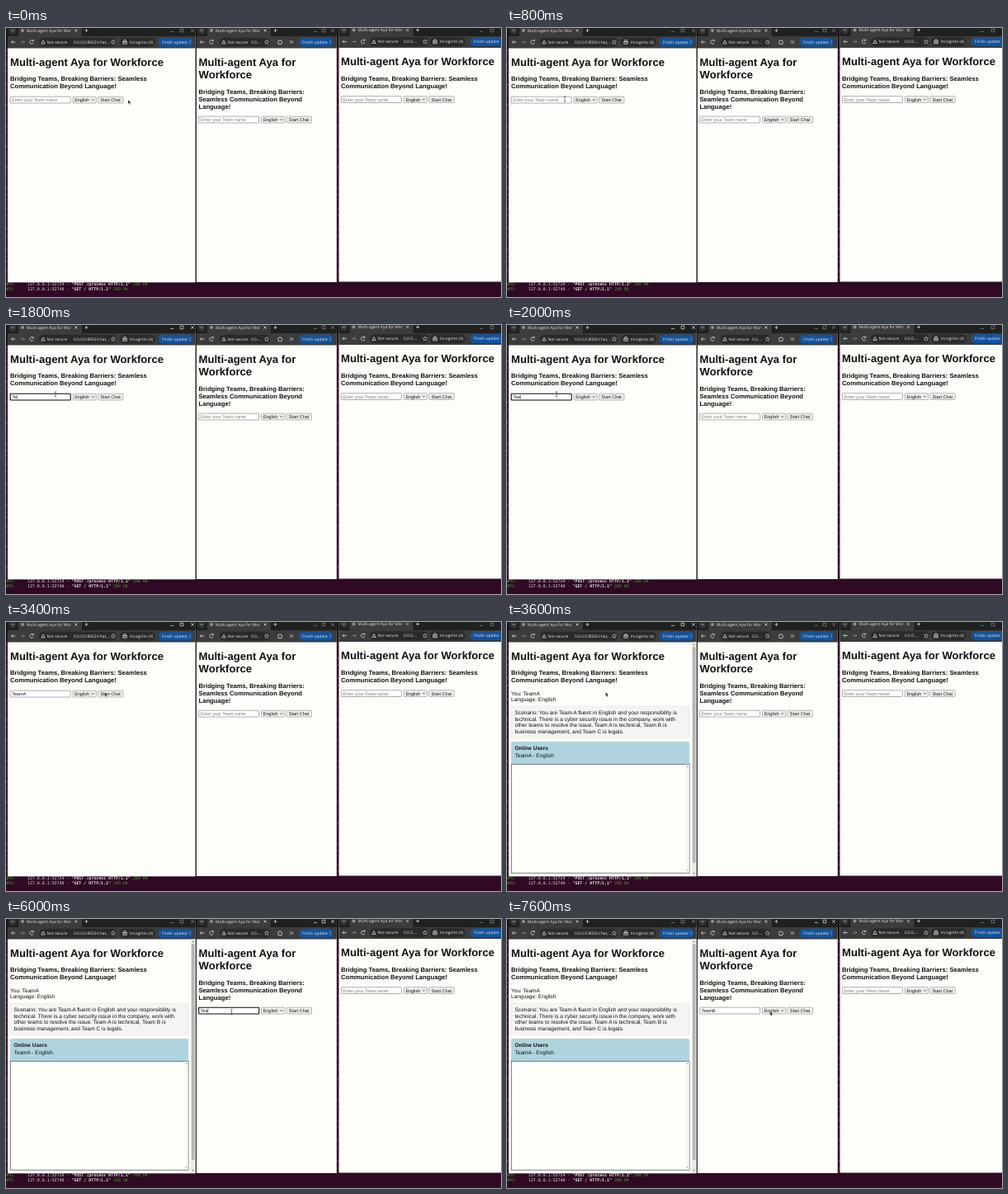
An HTML page for the animation above (8 s loop, 600 by 326 pixels).

```html
<!DOCTYPE html>
<html lang="en">
<head>
<meta charset="utf-8">
<title>Team chat</title>
<style>
  html, body { margin: 0; width: 100%; height: 100%; overflow: hidden; background: #300a24; }
  svg { display: block; }
  #stage { width: 600px; height: 326px; }
  text {
    font-family: "Liberation Sans", Arial, sans-serif; font-size: 6.56px; fill: #111;
    white-space: pre; text-rendering: geometricPrecision;
  }
  .h1 { font-size: 13.12px; font-weight: bold; }
  .h3 { font-size: 7.67px; font-weight: bold; }
  .b { font-weight: bold; }
  .form { font-size: 5.46px; }
  .hint { fill: #7b7b78; }
  .ui { font-family: "Open Sans", "Noto Sans", sans-serif; font-size: 4.9px; font-weight: 500; fill: #e6e6e4; }
  .term { font-family: "DejaVu Sans Mono", monospace; font-size: 4.94px; fill: #e4dfe2; }
  .ok { fill: #4e9a32; }
  .line { fill: none; stroke: #d6d6d4; stroke-width: .8; }
  .field { fill: #fff; stroke: #777; stroke-width: .6; }
  .focus { stroke: #0c0c0c; stroke-width: 1.1; }
  .btn { fill: #efefed; stroke: #777; stroke-width: .5; }
  .controls { opacity: .5; }
  .active .controls { opacity: 1; }
  .off { display: none; }
</style>
</head>
<body>
<svg id="stage" viewBox="0 0 600 326"></svg>
<script>
const LOOP = 8000, STEP = 200;
const stage = document.getElementById('stage');

const text = (x, y, str, cls = '') => `<text x="${x}" y="${y}" class="${cls}">${str}</text>`;
const rect = (x, y, w, h, fill, r = 0) =>
  `<rect x="${x}" y="${y}" width="${w}" height="${h}" rx="${r}" fill="${fill}"/>`;
const path = (d, extra = '') => `<path class="line" d="${d}" ${extra}/>`;
const lines = (x, y, gap, rows, cls) => rows.map((s, i) => text(x, y + i * gap, s, cls)).join('');

const back = x => path(`M${x + 2.5} 17h-5m2-2l-2 2 2 2`);
const forward = x => path(`M${x - 2.5} 17h5m-2-2l2 2-2 2`, 'opacity=".45"');
const reload = x => path(`M${x + 2} 15.6a2.3 2.3 0 1 0 .3 2.2M${x + 2.3} 14v1.8h-1.8`);
const star = x => path(`M${x} 14.4l.8 1.7 1.8.2-1.3 1.3.3 1.8-1.6-.9-1.6.9.3-1.8-1.3-1.3 1.8-.2z`, 'style="stroke-width:.6"');
const puzzle = x => path(`M${x - 2} 15.5h1.2a.9.9 0 0 1 1.8 0h1v1.3a.8.8 0 0 1 0 1.6v1.2h-4z`);
const more = x => path(`M${x - 2} 15.2l1.800 1.800-1.800 1.800m2.200-3.600l1.800 1.800-1.800 1.800`);
const guest = x => rect(x - 6, 11.7, 43, 10.8, '#292b2a', 5.4) + text(x + 6, 18.8, 'Incognito (4)', 'ui') +
  path(`M${x - 3} 16.5h6m-4.6 0l.6-2h2l.6 2`) +
  [-1.5, 1.5].map(d => `<circle cx="${x + d}" cy="18.6" r="1.1" class="line"/>`).join('');

function controls([min, max, close]) {
  return `<g class="controls">${path(`M${min - 2} 4.4h4M${max - 1.8} 1.2h3.6v3.6h-3.6z` +
    `M${close - 1.8} 1.2l3.6 3.6m0-3.6l-3.6 3.6`)}</g>`;
}

// Browser window; a narrow one folds its forward and guest buttons into an overflow mark.
function chrome({ x, w, h, y = 0, narrow, warn, url, host, fav, side, update, ctl }) {
  const o = x - 2, tabEnd = o + 92, pill = warn - 5;
  return rect(x, 0, w, h, '#fdfdf9') + rect(x, 0, w, 24.5 + y, '#3b3c3b') + rect(x, 0, w, 10, '#1f2120') +
    `<g transform="translate(0 ${y})">` +
    `<circle cx="${o + 8}" cy="3" r="4.5" fill="#343635"/>` + path(`M${o + 6.5} 2.3l1.5 1.5 1.5-1.5`) +
    rect(o + 15, -3, 77, 14, '#3b3c3b', 3) +
    `<circle cx="${o + 20}" cy="3" r="2" fill="#8f9190"/>` +
    `<svg x="${o + 25}" y="0" width="54" height="9">${text(0, 4.8, 'Multi-agent Aya for Workforce', 'ui')}</svg>` +
    path(`M${tabEnd - 8.5} 1.5l3 3m0-3l-3 3M${tabEnd + 3.5} 3h4m-2-2v4`) +
    back(o + 9) + (narrow ? reload(o + 20) : forward(o + 20) + reload(o + 31)) +
    rect(pill, 11.7, fav + 4 - pill, 10.8, '#292b2a', 5.4) +
    path(`M${warn} 15l2.2 4h-4.4z`, 'stroke-width=".7"') +
    text(warn + 4.5, 18.8, 'Not secure', 'ui b') + text(url, 18.8, host, 'ui') + star(fav) +
    (narrow ? puzzle(side) + more(side + 14) : guest(side)) +
    rect(update - 4.5, 11.5, 42, 11, '#15529a', 5.5) + text(update, 18.8, 'Finish update', 'ui') +
    path(`M${update + 34} 15v4.200`, 'stroke-dasharray=".9 .75"') +
    '</g>' + controls(ctl);
}

function form(id, x, y) {
  return `<g id="form${id}" transform="translate(${x} ${y})">
    <rect id="field${id}" class="field" x="5.2" y="83.2" width="73" height="7.8" rx=".8"/>
    ${text(7.2, 89, 'Enter your Team name', 'form hint')}
    <text id="typed${id}" x="7.2" y="89" class="form"></text>
    <path id="caret${id}" d="M0 84.6v5" stroke="#111" stroke-width=".5"/>
    <rect class="btn" x="81" y="83.2" width="28.3" height="7.8" rx="1"/>
    ${text(83.2, 89, 'English', 'form')}
    <path d="M103.6 86.2l1.6 1.7 1.6-1.7" fill="none" stroke="#222" stroke-width=".7"/>
    <rect class="btn" x="111.4" y="83.2" width="30.6" height="7.8" rx="1"/>
    ${text(114.3, 89, 'Start Chat', 'form')}
  </g>`;
}

const title = 'Multi-agent Aya for Workforce';
const heading = ['Bridging Teams, Breaking Barriers: Seamless', 'Communication Beyond Language!'];

const chat = `<g id="chat">
  ${lines(5, 88.9, 7.3, ['You: TeamA', 'Language: English'])}
  <rect x="5.2" y="102" width="216" height="38.3" rx="2" fill="#f4f5f2" stroke="#dcdcd9" stroke-width=".5"/>
  ${lines(9.5, 112.3, 7.4, [
    'Scenario: You are Team A fluent in English and your responsibility is',
    'technical. There is a cyber security issue in the company, work with',
    'other teams to resolve the issue. Team A is technical, Team B is',
    'business management, and Team C is legals.'])}
  <path d="M5 172v-25a2 2 0 0 1 2-2h212.2a2 2 0 0 1 2 2v25z" fill="#afd4de"/>
  ${text(9.5, 154.8, 'Online Users', 'b')}${text(9.5, 164.1, 'TeamA - English')}
  <rect x="5.3" y="172.3" width="215.8" height="131.9" fill="#fefefb" stroke="#444" stroke-width=".7"/>
  ${rect(216.6, 172.8, 4, 130.9, '#f7f7f5')}
  <path d="M217.5 176l1.1-1.4 1.1 1.4zM217.5 300.4l1.1 1.4 1.1-1.4z" fill="#888"/>
  ${rect(224, 24.5, 5.5, 283.5, '#e9e9e7')}${rect(224.9, 30, 3.7, 262, '#b5b5b3', 1.5)}
  <path d="M225.5 28l1.2-1.6 1.2 1.6zM225.5 304l1.2 1.6 1.2-1.6z" fill="#666"/>
</g>`;

const menu = `<g id="menu"><path d="M38.5 95.5l3.5-3.2 3.5 3.2z" fill="#1c1d1c"/>
  ${rect(35, 95, 51, 73, '#1c1d1c', 2)}
  ${lines(39, 103.8, 11.8, ['user', 'Samir', 'hi', 'dd', 'mj', 'ss'], 'ui')}</g>`;

const log = (y, port, call) => `<text class="term" x="-3.8" y="${y}"><tspan class="ok">INFO:</tspan>     ` +
  `127.0.0.1:${port} - <tspan class="b">"${call} HTTP/1.1"</tspan> <tspan class="ok">200 OK</tspan></text>`;

stage.innerHTML = rect(0, 0, 600, 326, '#300a24') +
  rect(0, 0, 600, 24, '#1b1219') + rect(229, 24, 2.5, 284, '#2b2a2b') +
  path('M.6 26V306M402.4 26V306', 'style="stroke:#9d8496;stroke-width:.8" stroke-dasharray="2 4 1 9 3 6" opacity=".6"') +
  log(311.8, 52724, 'POST /process') + log(318.2, 52740, 'GET /') +
  `<g id="win2">${chrome({ x: 231, w: 169.8, h: 308, narrow: true, warn: 264, url: 297, host: '0.0....',
    fav: 316, side: 332, update: 359, ctl: [375, 385, 396] })}
    ${lines(233.5, 45.8, 15.4, ['Multi-agent Aya for', 'Workforce'], 'h1')}
    ${lines(233.5, 79.5, 9, ['Bridging Teams, Breaking Barriers:', 'Seamless Communication Beyond', 'Language!'], 'h3')}
    ${form(2, 228.5, 24)}</g>` +
  chrome({ x: 403.5, w: 197, h: 307.5, y: -.5, warn: 446, url: 482, host: '0.0.0....',
    fav: 508, side: 520, update: 567, ctl: [576, 589, 602] }) +
  text(406, 45.2, title, 'h1') + lines(406, 64, 8.8, heading, 'h3') + form(3, 401.2, -.5) +
  `<g id="win1">${chrome({ x: 2, w: 227.5, h: 308.3, warn: 45, url: 82, host: '0.0.0.0:8002/chat,...',
    fav: 130, side: 144, update: 189, ctl: [201, 213, 226] })}
    ${text(5, 45.7, title, 'h1')}${lines(5, 64.4, 8.8, heading, 'h3')}
    ${form(1, 0, 0)}${menu}${chat}</g>
  <path id="arrow" d="M0 0v5l1.2-1 .9 1.9 1-.5-.9-1.8h1.6z" fill="#161616" stroke="#fff" stroke-width=".4"/>
  <path id="beam" d="M-1.2-3h2.4M0-3v6M-1.2 3h2.4" fill="none" stroke="#333" stroke-width=".6"/>`;

const el = Object.fromEntries([...stage.querySelectorAll('[id]')].map(n => [n.id, n]));

// Each track: [start ms, value...]; the last entry reached applies.
const typing1 = [[0, ''], [1600, 'T'], [1800, 'Te'], [2000, 'Tea'], [2800, 'Team'], [3000, 'TeamA']];
const typing2 = [[0, ''], [5400, 'T'], [6000, 'Tea'], [6400, 'Team'], [6600, 'TeamB']];
const pointer = [
  [0, 148, 87, 'arrow'], [400, 134, 88, 'arrow'], [600, 104, 88, 'arrow'], [800, 70, 86, 'beam'],
  [1000, 60, 84, 'beam'], [3200, 88, 86, 'arrow'], [3400, 119.5, 85, 'arrow'],
  [4000, 160, 92, 'arrow'], [4200, 218, 104, 'arrow'], [4400, 258, 111, 'beam'],
  [4800, 270, 112, 'beam'], [5000, 273.5, 112.5, 'beam'],
  [6800, 300, 112.5, 'beam'], [7000, 317, 112, 'arrow'], [7600, 318.8, 111.8, 'arrow']];

const at = (track, t) => track.findLast(k => k[0] <= t);
const within = (t, a, b) => t >= a && t < b;
const show = (node, on) => node.classList.toggle('off', !on);

function fill(id, value, focus) {
  const typed = el['typed' + id], caret = el['caret' + id];
  typed.textContent = value;
  show(el['form' + id].querySelector('.hint'), !value);
  el['field' + id].classList.toggle('focus', focus);
  show(caret, focus && value);
  if (value) caret.setAttribute('transform', `translate(${7.5 + typed.getComputedTextLength()} 0)`);
}

function draw(t) {
  show(el.form1, t < 3600);
  show(el.chat, t >= 3600);
  fill(1, at(typing1, t)[1], within(t, 1000, 3400));
  fill(2, at(typing2, t)[1], within(t, 5000, 7600));
  fill(3, '', false);
  show(el.menu, within(t, 1000, 1600));
  el.win1.classList.toggle('active', within(t, 1000, 5400));
  el.win2.classList.toggle('active', t >= 5400);
  const [, x, y, kind] = at(pointer, t);
  for (const k of ['arrow', 'beam']) show(el[k], k === kind);
  el[kind].setAttribute('transform', `translate(${x} ${y})`);
}

let last = -1;
function tick() {
  const t = Math.floor(performance.now() % LOOP / STEP) * STEP;
  if (t !== last) draw(last = t);
  requestAnimationFrame(tick);
}
tick();
</script>
</body>
</html>
```
